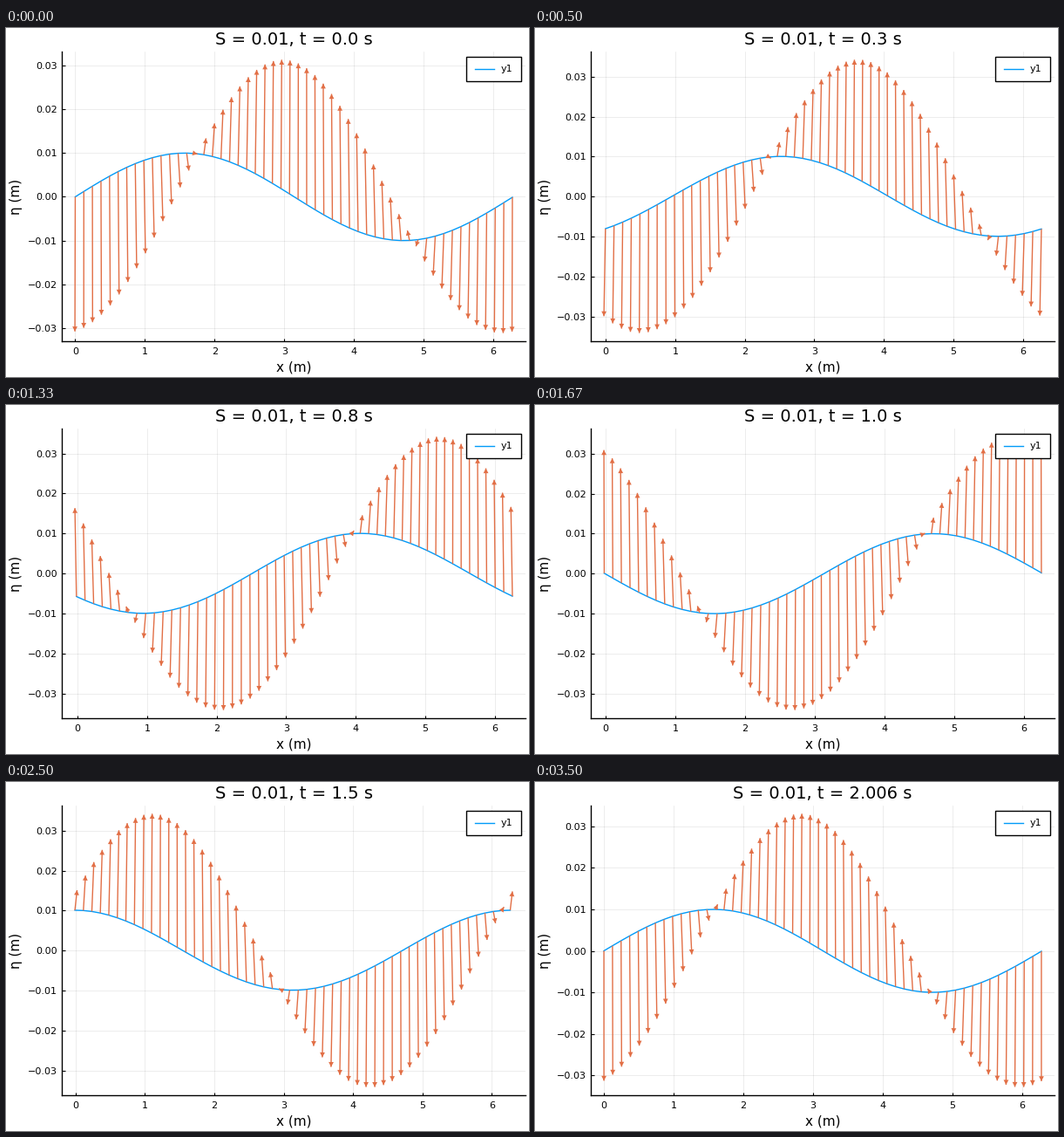
A matplotlib script that plays this animation: 600 px wide and 400 px high, repeating every 3.67 s.

```python
import numpy as np
import matplotlib.pyplot as plt
from matplotlib.animation import FuncAnimation
from matplotlib.collections import LineCollection, PolyCollection
from matplotlib.patches import Rectangle
from matplotlib.transforms import Affine2D

W, H, DPI = 600, 400, 100
LEFT, RIGHT, TOP, BOTTOM = 64, 596, 27, 359
LOOP_MS = 3670
TICKS_PER_STEP = 10
BLUE, ORANGE = "#009af9", "#e26f46"
HEAD_LEN, HEAD_HALF = 5.6, 2.9

# Deep-water wave with wavenumber 1, carrying the particles of its surface.
S = 0.01
OMEGA = np.sqrt(9.81)
X0 = np.arange(52) * 0.123
TIMES = [round(0.1 * i, 1) for i in range(21)] + [2.006]

plt.rcParams["font.family"] = "DejaVu Sans"


def pt(pixels):
    return pixels * 72 / DPI


def flow(p, t):
    phase = p[:, 0] - OMEGA * t
    speed = S * OMEGA * np.exp(p[:, 1])
    return np.column_stack([speed * np.sin(phase), -speed * np.cos(phase)])


def rk4(p, t, dt):
    k1 = flow(p, t)
    k2 = flow(p + dt / 2 * k1, t + dt / 2)
    k3 = flow(p + dt / 2 * k2, t + dt / 2)
    k4 = flow(p + dt * k3, t + dt)
    return p + dt / 6 * (k1 + 2 * k2 + 2 * k3 + k4)


def trace():
    path = [np.column_stack([X0, S * np.sin(X0)])]
    for t0, t1 in zip(TIMES, TIMES[1:]):
        path.append(rk4(path[-1], t0, t1 - t0))
    return path


PATH = trace()


def velocity(i):
    """Backward difference in time, forward for the first step."""
    a, b = (i - 1, i) if i else (0, 1)
    return (PATH[b] - PATH[a]) / (TIMES[b] - TIMES[a])


def padded(values):
    lo, hi = values.min(), values.max()
    pad = 0.03 * (hi - lo)
    return lo - pad, hi + pad


fig = plt.figure(figsize=(W / DPI, H / DPI), dpi=DPI, facecolor="white")
px = Affine2D().scale(1 / W, -1 / H).translate(0, 1) + fig.transFigure

ax = fig.add_axes([LEFT / W, 1 - BOTTOM / H,
                   (RIGHT - LEFT) / W, (BOTTOM - TOP) / H])
ax.set_axisbelow(True)
ax.grid(color="black", alpha=0.1, linewidth=0.5)
ax.spines[["top", "right"]].set_visible(False)
ax.spines[["left", "bottom"]].set_linewidth(1)
ax.tick_params(direction="in", length=pt(3.5), width=0.8, labelsize=8)
ax.tick_params(axis="x", pad=pt(15))
ax.tick_params(axis="y", pad=pt(5))

y_ticks = np.arange(-3, 4) / 100
ax.set_xticks(range(7))
ax.set_yticks(y_ticks, [f"{v:.2f}".replace("-", "\u2212") for v in y_ticks])
plt.setp(ax.get_xticklabels(), va="baseline")


def label(x, y, text, size, rotation=0):
    return fig.text(x, y, text, transform=px, fontsize=size, ha="center",
                    va="baseline", rotation=rotation, rotation_mode="anchor")


title = label(330, 19, "", 14)
label(330, 393.5, "x (m)", 11)
label(16, 193, "\u03b7 (m)", 11, rotation=90)

curve, = ax.plot([], [], color=BLUE, lw=1, zorder=2)
shafts = LineCollection([], colors=ORANGE, linewidths=1, zorder=3,
                        capstyle="butt")
heads = PolyCollection([], facecolors=ORANGE, edgecolors="none", zorder=3,
                       transform=px)
for part in (shafts, heads):
    ax.add_collection(part, autolim=False)

ax.add_patch(Rectangle((528.3, 33.3), 63, 28, transform=px, fc="white",
                       ec="black", lw=1, zorder=5, clip_on=False))
ax.plot([538, 560], [47, 47], color=BLUE, lw=1, transform=px, zorder=6,
        scalex=False, scaley=False)
ax.text(568, 50.5, "y1", transform=px, fontsize=8, va="baseline", zorder=6)


def to_pixels(points, xlim, ylim):
    fx = (points[:, 0] - xlim[0]) / (xlim[1] - xlim[0])
    fy = (points[:, 1] - ylim[0]) / (ylim[1] - ylim[0])
    return np.column_stack([LEFT + fx * (RIGHT - LEFT),
                            BOTTOM - fy * (BOTTOM - TOP)])


def draw(tick):
    # Each step shows one tick early, so rounding never makes it late.
    i = min((tick + 1) // TICKS_PER_STEP, len(TIMES) - 1)
    tails = PATH[i]
    tips = tails + velocity(i)
    both = np.vstack([tails, tips])
    xlim, ylim = padded(both[:, 0]), padded(both[:, 1])
    ax.set_xlim(xlim)
    ax.set_ylim(ylim)

    curve.set_data(tails[:, 0], tails[:, 1])
    shafts.set_segments(np.stack([tails, tips], axis=1))

    end = to_pixels(tips, xlim, ylim)
    d = end - to_pixels(tails, xlim, ylim)
    d /= np.hypot(d[:, 0], d[:, 1])[:, None]
    base = end - HEAD_LEN * d
    side = HEAD_HALF * np.column_stack([-d[:, 1], d[:, 0]])
    heads.set_verts(np.stack([end, base + side, base - side], axis=1))

    title.set_text(f"S = {S}, t = {TIMES[i]} s")
    return curve, shafts, heads, title


TICKS = len(TIMES) * TICKS_PER_STEP
anim = FuncAnimation(fig, draw, frames=TICKS, interval=LOOP_MS / TICKS,
                     repeat=True, repeat_delay=0, blit=False)
plt.show()
```
